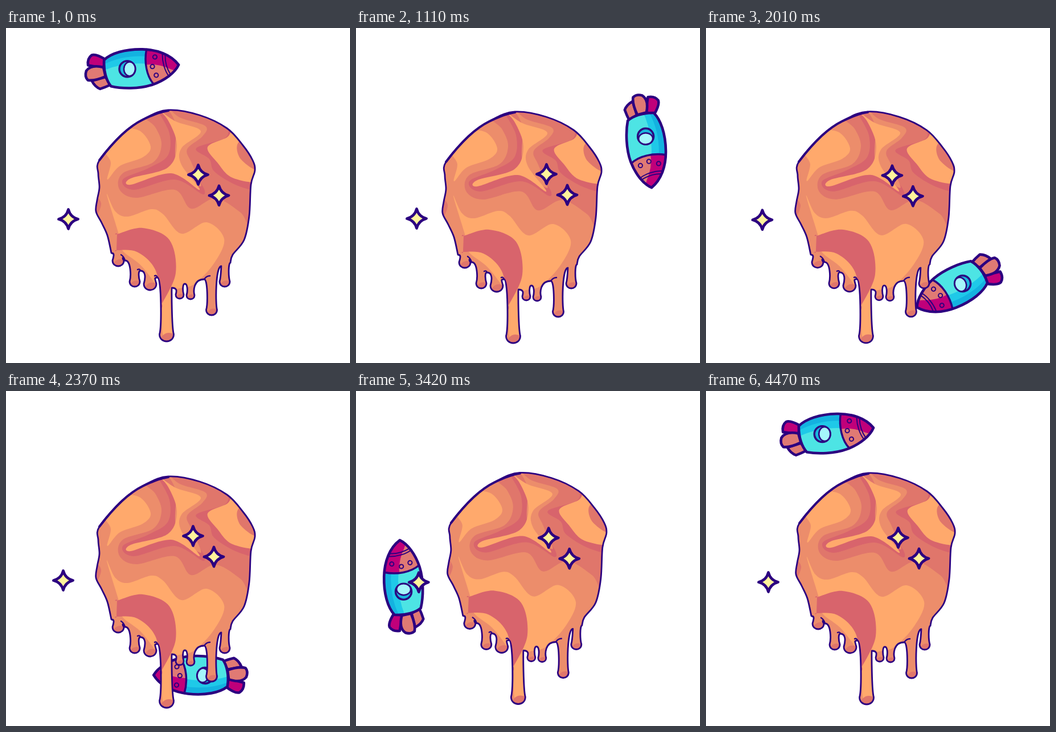
An HTML page that plays this animation: 604x588 px, repeating every 4500 ms.

```html
<!DOCTYPE html>
<html lang="en">
<head>
<meta charset="utf-8">
<title>Melting planet</title>
<style>
  html, body { margin: 0; width: 100%; height: 100%; overflow: hidden; background: #fff; }
  svg { display: block; width: 604px; height: 588px; }
</style>
</head>
<body>
<svg id="stage" viewBox="0 0 604 588" fill="none" stroke="#2c0080" stroke-linecap="round" stroke-linejoin="round">
  <defs>
    <path id="body" d="M304 64C290 46 265 38 240 38C210 38 185 46 173 58C172 78 178 95 186 104C205 108 235 108 258 100C280 92 298 78 304 64Z"/>
    <clipPath id="hull"><use href="#body"/></clipPath>
    <clipPath id="crust"><path id="crustShape"/></clipPath>
  </defs>

  <g id="rocket" stroke-width="4.6">
    <path fill="#c0007a" d="M175 57Q158 47 151 50Q143 56 145 68L172 72Z"/>
    <path fill="#e07a74" d="M152 95Q158 106 167 109Q176 106 186 101L176 88Z"/>
    <path fill="#e07a74" d="M172 71Q150 66 142 78Q139 88 145 94Q156 96 176 87Z"/>
    <g clip-path="url(#hull)" stroke="none">
      <path fill="#4de4e4" d="M165 30H310V115H165Z"/>
      <path fill="#1fc9e8" d="M165 30H255V64Q207 59 165 80Z"/>
      <path fill="#14b2e0" d="M165 30H255V51Q206 46 165 70Z"/>
      <path fill="#e07a74" d="M247 36C243 60 248 85 261 102H310V36Z"/>
      <path fill="#c0007a" d="M245 36H310V78L290 72Q268 62 246 65Z"/>
    </g>
    <path stroke-width="3.4" d="M247 38C243 60 248 85 261 99"/>
    <path stroke-width="2" d="M275 46C275 60 280 75 287 84M280 48C280 60 284 72 290 81"/>
    <g stroke-width="2"><circle cx="262" cy="51" r="3.6"/><circle cx="258" cy="68" r="3.6"/><circle cx="265" cy="83" r="3.6"/></g>
    <circle cx="214" cy="73" r="14" fill="#19b6dc" stroke-width="3.4"/>
    <ellipse cx="218" cy="73" rx="10" ry="12.5" fill="#a5f6fb" stroke-width="2.5"/>
    <use href="#body"/>
  </g>

  <g id="planet">
    <g id="swirls" clip-path="url(#crust)" stroke="none"></g>
    <path id="rim" stroke-width="2.8"/>
    <path stroke-width="4" d="M164 232Q205 178 240 161Q266 148 285 145"/>
    <path stroke-width="2.4" d="M209 408q-2-7-7-10M236 426q-1-4-5-2M266 438q-2-5-5-3M348 441q4-6 10-6"/>
  </g>

  <g id="stars" fill="#fff39b" stroke-width="4.8"></g>
</svg>
<script>
const LOOP = 4500, STEP = 30;
const LIGHT = '#ffa96c', MID = '#ec8d6b', DEEP = '#e0766b', DARK = '#d8646c';
const $ = id => document.getElementById(id);

// Smooth curve through "x,y x,y ..." points; a doubled point makes a corner.
function curve(text, closed = true) {
  const p = text.split(' ').map(s => s.split(',').map(Number)), n = p.length;
  const at = i => closed ? p[(i + n) % n] : p[Math.max(0, Math.min(n - 1, i))];
  const lean = (a, b, c) => b.map((v, k) => v + (c[k] - a[k]) / 6);
  let d = 'M' + p[0];
  for (let i = 0; i < (closed ? n : n - 1); i++) {
    const [a, b, c, e] = [at(i - 1), at(i), at(i + 1), at(i + 2)];
    d += `C${lean(a, b, c)} ${lean(e, c, b)} ${c}`;
  }
  return d;
}

function add(parent, tag, attrs) {
  const el = document.createElementNS('http://www.w3.org/2000/svg', tag);
  for (const k in attrs) el.setAttribute(k, attrs[k]);
  parent.append(el);
}

// Right to left: tip x, tip y, radius, then the notch that follows.
const drips = [
  [384, 454, 9, 378, 418], [361, 504, 9.5, 348, 441], [324, 476, 7, 314, 449], [305, 475, 7, 291, 456],
  [282, 550, 12.5, 266, 438], [253, 460, 11, 236, 426], [226, 454, 9, 209, 408], [197, 418, 10, 185, 395]
];

// Narrow neck, round tip, then up to the next notch.
function drip([x, y, r, nx, ny], top) {
  const neck = r * .7;
  return `C${x + neck},${top} ${x + neck},${y - 2 * r} ${x + r},${y - r}`
    + `C${x + r},${y + r / 3} ${x - r},${y + r / 3} ${x - r},${y - r}`
    + `C${x - neck},${y - 2 * r} ${x - neck},${ny} ${nx},${ny}`;
}

const crown = '185,395 178,364 168,342 158,322 160,302 164,280 162,256 164,232 205,185 245,158 285,144 340,153 388,176 416,206 433,232 437,250 430,275 427,330 418,372 398,398 394,412';
const rim = curve(crown, false) + drips.map((d, i) => drip(d, i ? drips[i - 1][4] : 412)).join('') + 'Z';
$('crustShape').setAttribute('d', rim);
$('rim').setAttribute('d', rim);

add($('swirls'), 'path', { d: 'M140 130H450V560H140Z', fill: MID });
[
  // upper left pool
  [LIGHT, '174,212 200,180 234,180 254,208 240,227 200,242 178,266 184,236'],
  // swirl and its core
  [DEEP, '240,150 262,174 273,205 258,236 205,255 199,283 228,298 296,284 325,317 368,299 412,324 435,350 450,200 400,140 296,140'],
  [DARK, '268,146 287,185 284,224 250,246 205,266 224,284 296,266 346,292 340,270 300,240 300,180'],
  [DARK, '390,165 386,192 334,211 357,230 366,252 405,276 444,284 444,255 376,235 400,185'],
  // centre tongue
  [MID, '282,138 305,157 350,172 345,190 318,213 326,237 342,278 300,240 298,170'],
  [LIGHT, '262,138 284,161 300,205 284,245 219,264 219,275 290,255 340,284 308,240 308,211 342,181 296,163'],
  // right pool
  [LIGHT, '354,209 388,192 404,178 450,220 450,268 398,263 371,236'],
  [DEEP, '406,205 413,231 444,248 450,200 425,190'],
  // lower pool with the long drip
  [LIGHT, '177,292 192,322 214,331 255,318 276,327 308,361 352,341 383,370 366,412 330,450 291,468 300,545 276,540 271,470 240,420 204,390 198,362'],
  // crater and left edge
  [DARK, '195,362 195,362 240,351 287,372 298,430 274,484 274,484 262,424 230,393 194,390 194,390'],
  [DEEP, '154,292 167,308 158,328']
].forEach(([fill, points]) => add($('swirls'), 'path', { d: curve(points), fill }));
drips.forEach(([x, y, r]) => add($('swirls'), 'circle', { cx: x + r / 3, cy: y, r: r * 1.2, fill: DEEP }));

const spark = 'M0-17Q3.5-3.5 17 0Q3.5 3.5 0 17Q-3.5 3.5-17 0Q-3.5-3.5 0-17Z';
[[337.5, 257.5], [374, 294], [109.5, 335.5]].forEach(([x, y]) =>
  add($('stars'), 'path', { d: spark, transform: `translate(${x} ${y})` }));

// Drift: time, planet x and y, stars x and y.
const poses = [
  [0, 0, 0, 0, 0], [1110, -6, 3, -3, -1], [1680, -2, 0, -12, 5], [2370, 0, 6, -9, -3],
  [2970, 4, -1, .5, .5], [3900, 1.5, 0, 1, 0], [LOOP, 0, 0, 0, 0]
];

function drift(t) {
  const i = poses.findIndex(p => p[0] > t), a = poses[i - 1], b = poses[i];
  const u = (t - a[0]) / (b[0] - a[0]), ease = u * u * (3 - 2 * u);
  return a.map((v, k) => v + (b[k] - v) * ease);
}

function draw(now) {
  const t = Math.floor(now % LOOP / STEP) * STEP;
  const turn = t / LOOP * 360, rad = deg => deg * Math.PI / 180;
  const x = 299.5 + 228 * Math.cos(rad(turn + 247.7));
  const y = 280 + 225 * Math.sin(rad(turn + 247.7));
  const heading = turn - 1 + 2.5 * Math.cos(rad(turn - 30));
  const [, px, py, sx, sy] = drift(t);
  $('rocket').setAttribute('transform', `translate(${x} ${y}) rotate(${heading}) translate(-214 -73)`);
  $('planet').setAttribute('transform', `translate(${px} ${py})`);
  $('stars').setAttribute('transform', `translate(${sx} ${sy})`);
}

const start = performance.now();
function tick() {
  draw(performance.now() - start);
  requestAnimationFrame(tick);
}
tick();
</script>
</body>
</html>
```
